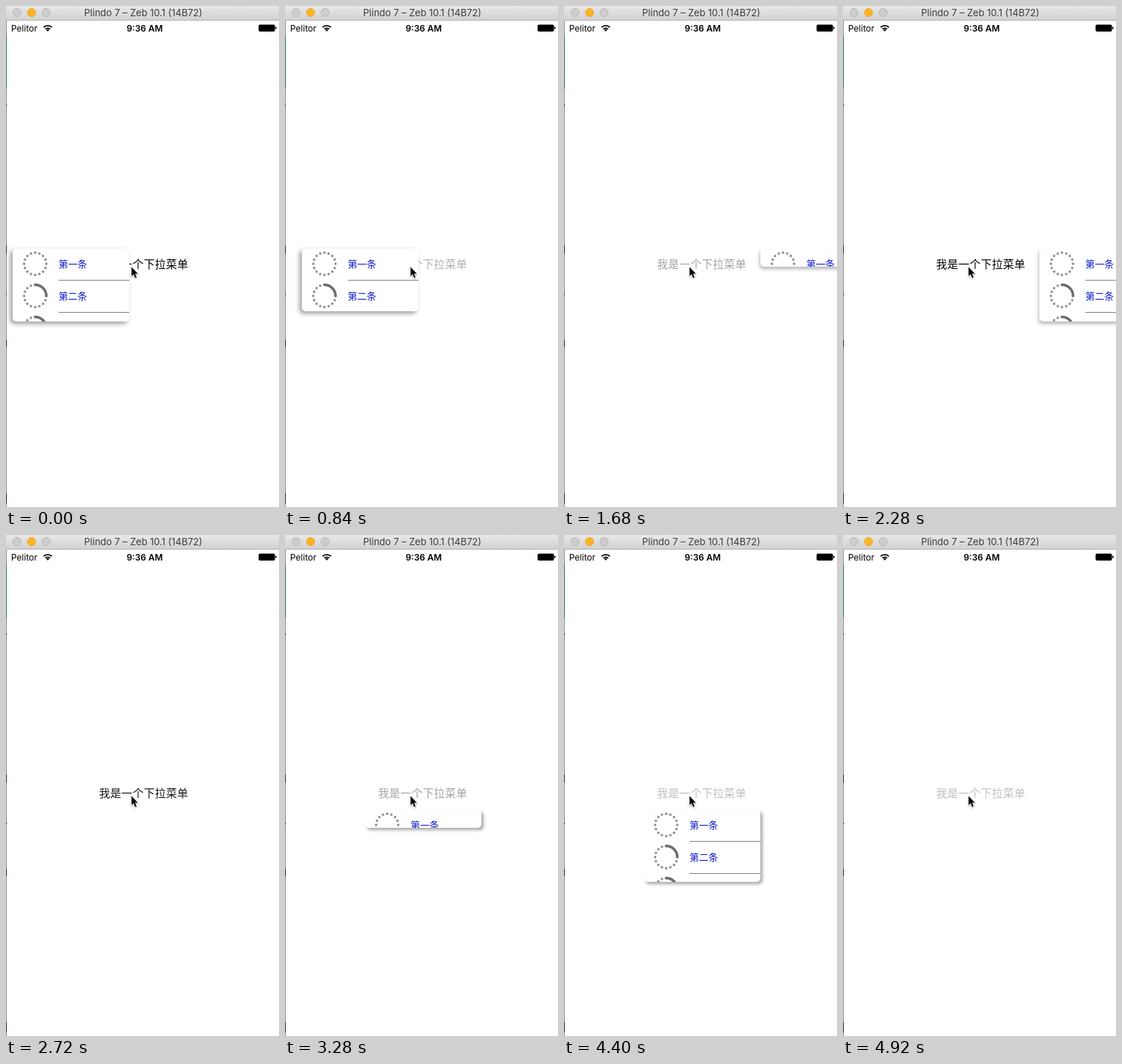
Animation of 374 by 686 pixels, one loop 5.04 s. Source, as an HTML page:

```html
<!DOCTYPE html>
<html lang="zh">
<head>
<meta charset="utf-8">
<title>下拉菜单</title>
<style>
html, body { margin: 0; width: 100%; height: 100%; overflow: hidden; background: #fff; }
#stage { position: relative; width: 374px; height: 686px; overflow: hidden; background: #fff; }
#stage > svg { position: absolute; left: 0; top: 0; }
.latin { font-family: Inter, Roboto, sans-serif; }
#label, #menu { position: absolute; font-family: "Noto Sans CJK SC", "Noto Sans CJK", sans-serif; white-space: nowrap; }
#label { left: 127.5px; top: 341px; font-size: 15px; line-height: 24px; letter-spacing: .3px; }
#menu { width: 160px; background: #fff; border-radius: 5px; }
#clip { height: 100%; overflow: hidden; border-radius: 5px; }
.row { position: relative; height: 44px; }
.row svg { position: absolute; left: 14px; top: 4px; fill: none; }
.row span { position: absolute; left: 63px; top: 11px; font-size: 13px; line-height: 20px; color: #0a18cc; }
.row i { position: absolute; left: 63px; right: 0; top: 43px; height: 1px; background: #828282; }
#cursor { filter: drop-shadow(0 1px 1px rgba(0,0,0,.35)); }
</style>
</head>
<body>
<div id="stage">
  <svg width="374" height="686" class="latin">
    <defs>
      <linearGradient id="bar" x2="0" y2="1">
        <stop stop-color="#e8e8e8"/><stop offset="1" stop-color="#d1d1d1"/>
      </linearGradient>
    </defs>
    <path d="M.5 20V686" stroke="#8a8a8a"/>
    <path d="M.5 41V113" stroke="#1f6d62"/>
    <path d="M.5 135v2M.5 328v11M.5 394v2M.5 457v10M.5 667v14" stroke="#222"/>
    <rect width="374" height="19" fill="url(#bar)"/>
    <rect y="19" width="374" height="1" fill="#b2b2b2"/>
    <g fill="#cdcdcd" stroke="#b8b8b8">
      <circle cx="15" cy="9" r="5.5"/>
      <circle cx="35" cy="9" r="5.5" fill="#fdb424" stroke="#efa622"/>
      <circle cx="55" cy="9" r="5.5"/>
    </g>
    <text x="188" y="14" font-size="13" text-anchor="middle" fill="#3c3c3c">Plindo 7 – Zeb 10.1 (14B72)</text>
    <text x="7" y="34.5" font-size="12">Pelitor</text>
    <text x="190" y="34.5" font-size="12" font-weight="600" text-anchor="middle">9:36 AM</text>
    <g fill="none" stroke="#000" stroke-width="1.8">
      <path d="M51.5 29.2a8 8 0 0 1 11.4 0M53.9 31.7a4.6 4.6 0 0 1 6.6 0"/>
      <path d="M55.2 32.8a2.8 2.8 0 0 1 4 0L57.2 35z" fill="#000" stroke="none"/>
    </g>
    <rect x="346" y="25.5" width="22.5" height="9.5" rx="2"/>
    <path d="M369 28.3q1.8 .4 1.8 1.7t-1.8 1.7z"/>
  </svg>
  <div id="label">我是一个下拉菜单</div>
  <div id="menu"><div id="clip"></div></div>
  <svg width="374" height="686">
    <path id="cursor" d="M172 357.5v12.3l2.8-2.6 2.1 5 2-.8-2.1-4.9h3.8z" stroke="#fff" stroke-width="1.4" paint-order="stroke"/>
  </svg>
</div>
<script>
const LOOP = 5040, SLIDE = 300, FADE = 400;
const GREY = 192;
const menu = document.getElementById('menu');
const label = document.getElementById('label');

// x: [closed, open]
const menus = [
  { open: -SLIDE, close: 768, x: [109, 9], y: 332, shadow: '-3px 3px 6px rgba(0,0,0,.4)' },
  { open: 1580, close: 2410, x: [269, 269], y: 332, shadow: '-1px 3px 5px rgba(0,0,0,.3)' },
  { open: 3180, close: 4380, x: [109, 109], y: 376, shadow: '3px 3px 4px rgba(0,0,0,.35)' }
];
// Each press turns the label grey until its release starts the fade back.
const presses = [
  { down: 600, up: 768 }, { down: 1400, up: 1580 }, { down: 2320, up: 2410 },
  { down: 3000, up: 3180 }, { down: 4200, up: 4380 }, { down: 4920, up: LOOP }
];
const arcs = ['', 'M17 1.8A15.2 15.2 0 0 1 32.2 17', 'M17 1.8A15.2 15.2 0 0 1 17 32.2'];

document.getElementById('clip').innerHTML = ['一', '二', '三'].map((n, i) => `
  <div class="row">
    <svg width="34" height="34" stroke-linecap="round" stroke-width="3.4">
      <circle cx="17" cy="17" r="15.2" stroke="#8c8c8c" pathLength="16" stroke-dasharray="0 1"/>
      <path d="${arcs[i]}" stroke="#6c6c6c"/>
    </svg>
    <span>第${n}条</span><i></i>
  </div>`).join('');

function ease(p) {
  p = Math.min(1, Math.max(0, p));
  return (1 - Math.cos(Math.PI * p)) / 2;
}

function draw() {
  const t = performance.now() % LOOP;

  const m = menus.filter(s => t >= s.open).pop();
  const shown = ease((t - m.open) / SLIDE) - ease((t - m.close) / SLIDE);
  menu.style.left = m.x[0] + (m.x[1] - m.x[0]) * shown + 'px';
  menu.style.top = m.y + 'px';
  menu.style.height = 100 * shown + 'px';
  menu.style.boxShadow = m.shadow;
  menu.style.visibility = shown > .001 ? 'visible' : 'hidden';

  const press = presses.filter(p => t >= p.down).pop();
  const grey = press ? GREY * (1 - ease((t - press.up) / FADE)) : 0;
  label.style.color = `rgb(${grey},${grey},${grey})`;

  requestAnimationFrame(draw);
}
draw();
</script>
</body>
</html>
```
